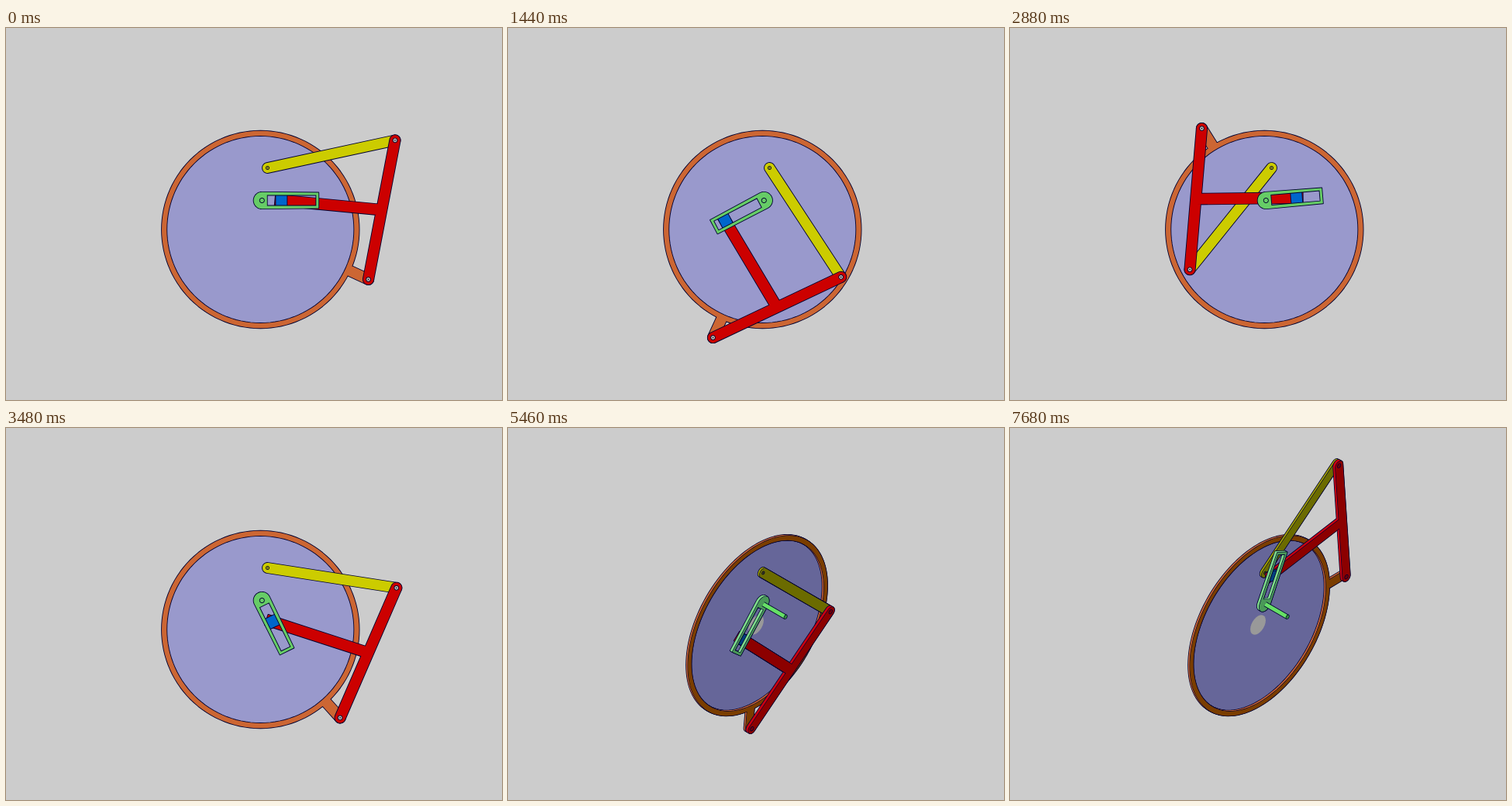
Write an HTML page that moves like this. It is 640x480 px and loops after 7740 ms.

```html
<!DOCTYPE html>
<html lang="en">
<head>
<meta charset="utf-8">
<title>Drag-link mechanism</title>
<style>
  html, body { margin: 0; width: 100%; height: 100%; overflow: hidden; background: #ccc; }
  svg { display: block; width: 640px; height: 480px; }
  path { paint-order: stroke; stroke-linejoin: round; }
</style>
</head>
<body>
<svg id="stage" viewBox="0 0 640 480"></svg>
<script>
const stage = document.getElementById('stage');
const STEP = 60, STEPS = 129, ISO_START = 69, HOLD = 60;
const RAD = Math.PI / 180, QUARTER = Math.PI / 2;
const INK = '#000030';

// Fixed pivots and link lengths
const O = [328.3, 260], A = [337.5, 180.5], G = [330.3, 222.5];
const RING_ARM = 153.4, ROCKER = 168.3, COUPLER = 182.7, STEM = 130;

// Face colour in the front view, face and side colours in the isometric view
const COLORS = {
  disk: ['#9999cc', '#666699', '#666699'],
  ring: ['#cc6633', '#7a3d00', '#cc6633'],
  yellow: ['#cccc00', '#6b6b00', '#a3a300'],
  red: ['#cc0000', '#8c0000', '#cc0010'],
  block: ['#0066cc', '#00407f', '#0059b3'],
  green: ['#66cc66', '#4a9958', '#7fdc8a']
};

let iso = false;

const project = ([x, y], z) => {
  if (!iso) return [x, y];
  const u = x - O[0], v = y - O[1];
  return [320 + (u + z) * 0.7071, 254 + (z - u) * 0.4082 + v * 0.8165];
};

// Point in a frame at p turned by angle a
const at = (p, a, along, across = 0) => [
  p[0] + along * Math.cos(a) - across * Math.sin(a),
  p[1] + along * Math.sin(a) + across * Math.cos(a)
];
const angle = (p, q) => Math.atan2(q[1] - p[1], q[0] - p[0]);

function arc(c, r, from, to, n = 16) {
  return Array.from({ length: n + 1 }, (_, i) => at(c, from + (to - from) * i / n, r));
}
const circle = (c, r, n = 24) => arc(c, r, 0, 4 * QUARTER, n);

function capsule(p, q, r) {
  const a = angle(p, q);
  return [...arc(q, r, a - QUARTER, a + QUARTER), ...arc(p, r, a + QUARTER, a + 3 * QUARTER)];
}

function strip(p, a, from, to, half) {
  return [at(p, a, to, -half), at(p, a, to, half), at(p, a, from, half), at(p, a, from, -half)];
}

const outline = (shapes, z) => shapes.map(points =>
  'M' + points.map(p => project(p, z).map(n => n.toFixed(2)).join(' ')).join('L') + 'Z').join('');

const paint = (d, fill, width) =>
  `<path d="${d}" fill="${fill}"` + (width ? ` stroke="${INK}" stroke-width="${width}"` : '') + '/>';

function solid(shapes, color, z0, z1) {
  const [flat, face, side] = COLORS[color];
  if (!iso) return paint(outline(shapes, 0), flat, 1.8);
  const layers = [];
  for (let z = z0; z < z1; z++) layers.push(outline(shapes, z));
  layers.push(outline(shapes, z1));
  return layers.map(d => paint(d, INK, 1.6)).join('')
    + layers.map(d => paint(d, side)).join('')
    + paint(layers[layers.length - 1], face, 1.3);
}

function pin(p, r, z, fill) {
  return paint(outline([circle(p, r)], z), fill, 1.8)
    + paint(outline([circle(p, 0.8, 8)], z), INK);
}

function shaft() {
  const [x1, y1] = project(G, 11), [x2, y2] = project(G, 52);
  const line = (color, width) =>
    `<line x1="${x1}" y1="${y1}" x2="${x2}" y2="${y2}" stroke="${color}" stroke-width="${width}"/>`;
  return line(INK, 6.6) + line('#66e066', 5) + paint(outline([circle(G, 2.6)], 52), '#338840', 1.4);
}

function rockerAngle(n) {
  if (iso) return (57 - 12 * n) * RAD;
  const k = n < HOLD ? n : n - 1;
  const lead = k % 30 > 7 ? 3 : 0;
  return (-12.2 - 12 * k - lead) * RAD;
}

function solve(theta) {
  const C = at(A, theta, ROCKER);
  const d = Math.hypot(C[0] - O[0], C[1] - O[1]);
  const bend = Math.acos((RING_ARM ** 2 + d * d - COUPLER ** 2) / (2 * RING_ARM * d));
  const ringAngle = angle(O, C) + bend;
  const B = at(O, ringAngle, RING_ARM);
  const middle = [(B[0] + C[0]) / 2, (B[1] + C[1]) / 2];
  const stemAngle = angle(B, C) - 95.5 * RAD;
  const P = at(middle, stemAngle, STEM);
  return { B, C, P, middle, ringAngle, stemAngle, slotAngle: angle(G, P) };
}

function draw(n) {
  iso = n >= ISO_START;
  const { B, C, P, middle, ringAngle, stemAngle, slotAngle } = solve(rockerAngle(n));

  const ring = [
    circle(O, 127.3, 120),
    circle(O, 121, 120).reverse(),
    capsule(at(O, ringAngle, 129), B, 6.7),
    strip(O, ringAngle, 122, 130, 6.7)
  ];
  const coupler = [capsule(B, C, 6.7), strip(middle, stemAngle, 0, STEM + 8, 6.9)];
  const slider = [strip(P, slotAngle, -7, 7, 7)];
  const slot = [
    [...arc(G, 10.7, slotAngle + QUARTER, slotAngle + 3 * QUARTER),
      at(G, slotAngle, 73, -10), at(G, slotAngle, 73, 10)],
    strip(G, slotAngle, 6.5, 70, 7).reverse()
  ];

  const pinFill = iso ? COLORS.red[1] : '#b8b8b0';
  let out = paint(outline([circle(O, 121.5, 120)], 0), COLORS.disk[iso ? 1 : 0]);
  if (iso) out += paint(outline([circle(O, 14)], 0), '#999');
  out += solid(ring, 'ring', 0, 3)
    + solid([capsule(A, C, 6.5)], 'yellow', 1, 4)
    + pin(A, 1.6, 4, COLORS.yellow[iso ? 1 : 0])
    + solid(coupler, 'red', 4, 8)
    + pin(B, 2.4, 8, pinFill)
    + pin(C, 2.4, 8, pinFill)
    + solid(slider, 'block', 6, 9)
    + solid(slot, 'green', 7, 11)
    + (iso ? shaft() : paint(outline([circle(G, 2.6)], 0), COLORS.green[0], 1.8));
  stage.innerHTML = out;
}

const start = performance.now();
let shown = -1;
function tick() {
  const n = Math.floor((performance.now() - start) / STEP) % STEPS;
  if (n !== shown) draw(shown = n);
  requestAnimationFrame(tick);
}
tick();
</script>
</body>
</html>
```
